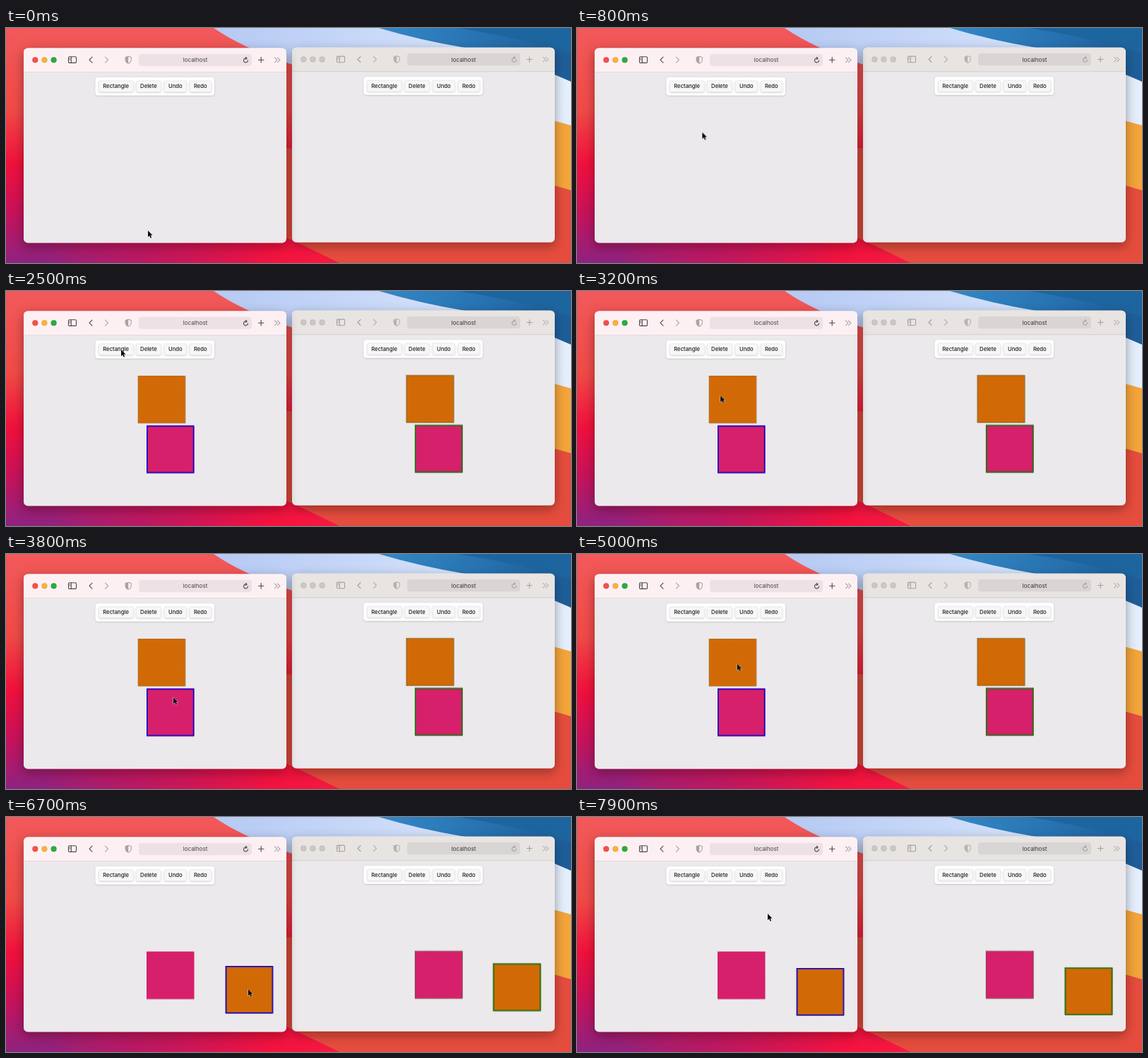
Animation, 800 px wide and 333 px high, one loop 8 s. Source, as an HTML page:

```html
<!DOCTYPE html>
<html lang="en">
<head>
<meta charset="utf-8">
<title>Shared canvas in two windows</title>
<style>
html, body { margin: 0; width: 100%; height: 100%; overflow: hidden; background: #ee4a48; }
svg { display: block; width: 800px; height: 333px; }
text { font-family: Inter, "Noto Sans", sans-serif; text-anchor: middle; }

.active { --bar: #fdf0f3; --line: #e3d5d8; --pill: #ede1e5; --icon: #4d474a; --soft: #aaa1a5;
  --red: #f54f4b; --yellow: #f9b23c; --green: #29ad3c; --label: #4b4548; }
.idle { --bar: #e8e4e2; --line: #cfcac8; --pill: #d9d5d4; --icon: #a5a09f; --soft: #b7b2b1;
  --red: #cbc7c5; --yellow: #cbc7c5; --green: #cbc7c5; --label: #383536; }
.mine { --pick: #0900d6; --edge: #777368; }
.theirs { --pick: #14780f; --edge: #4c5b2e; }

.stroke { fill: none; stroke: var(--icon); stroke-width: 1.1; stroke-linecap: round; stroke-linejoin: round; }
.soft { stroke: var(--soft); }
.button { fill: #f8f7f8; stroke: #e5e3e5; stroke-width: .7; }
.label { font-size: 7.7px; font-weight: 500; fill: #1d1c1d; }
.dots { fill: none; stroke: var(--edge); stroke-width: .7; stroke-dasharray: 1.3 1.3; }
.pick { fill: none; stroke: var(--pick); stroke-width: 1.6; }

.orange, .pink, .orange .pick, .pink .pick, .drag, .cursor { animation: 8s linear infinite; }
.orange, .pink, .pick { animation-timing-function: step-end !important; }
.orange { animation-name: show-first; }
.pink { animation-name: show-second; }
.orange .pick { animation-name: pick-first; }
.pink .pick { animation-name: pick-second; }
.mine .drag { animation-name: drag; }
.theirs .drag { animation-name: follow; }
.cursor { animation-name: point; }

@keyframes show-first { 0% { opacity: 0; } 15%, 100% { opacity: 1; } }
@keyframes show-second { 0% { opacity: 0; } 28.75%, 100% { opacity: 1; } }
@keyframes pick-first { 0% { opacity: 1; } 28.75% { opacity: 0; } 66.25%, 100% { opacity: 1; } }
@keyframes pick-second { 0% { opacity: 1; } 66.25%, 100% { opacity: 0; } }
@keyframes drag {
  0%, 67.5% { transform: translate(0, 0); }
  73.75% { transform: translate(75px, 1.5px); }
  78% { transform: translate(121px, 38px); }
  83.75% { transform: translate(124px, 91px); }
  86%, 100% { transform: translate(124px, 94px); }
}
@keyframes follow {
  0%, 69.5% { transform: translate(0, 0); }
  73.75% { transform: translate(50.5px, 1.5px); }
  75.5% { transform: translate(75px, 4px); }
  80% { transform: translate(121px, 45px); }
  83.75% { transform: translate(123px, 88.2px); }
  87%, 100% { transform: translate(124px, 94px); }
}
@keyframes point {
  0%, 2.5% { transform: translate(201px, 287px); }
  8% { transform: translate(184px, 180px); }
  13.75% { transform: translate(165px, 88px); }
  18.75% { transform: translate(164px, 86.5px); }
  26%, 34% { transform: translate(163px, 83px); }
  40% { transform: translate(203px, 148px); }
  45%, 56% { transform: translate(237px, 203px); }
  63%, 67.5% { transform: translate(226px, 152px); }
  73.75% { transform: translate(301px, 153px); }
  78% { transform: translate(341px, 190px); }
  83.75% { transform: translate(343px, 244px); }
  86%, 91% { transform: translate(343px, 247px); }
  98.75% { transform: translate(270px, 137px); }
  100% { transform: translate(265px, 129px); }
}
</style>
</head>
<body>
<svg viewBox="0 0 800 333">
  <defs>
    <linearGradient id="redWave" x1="0" y1="0" x2="0" y2="1">
      <stop offset="0" stop-color="#f2595a"/>
      <stop offset=".35" stop-color="#f04a47"/>
      <stop offset=".58" stop-color="#f1103c"/>
      <stop offset=".78" stop-color="#c9125a"/>
      <stop offset="1" stop-color="#8d2380"/>
    </linearGradient>
    <linearGradient id="crimson">
      <stop offset="0" stop-color="#f3123f" stop-opacity="0"/>
      <stop offset=".3" stop-color="#d8124f" stop-opacity=".55"/>
      <stop offset=".75" stop-color="#f3123f"/>
      <stop offset="1" stop-color="#f61a40"/>
    </linearGradient>
    <linearGradient id="sky">
      <stop offset="0" stop-color="#b5c9f3"/>
      <stop offset=".45" stop-color="#c9d9f8"/>
      <stop offset="1" stop-color="#e6effc"/>
    </linearGradient>
    <linearGradient id="deep">
      <stop offset="0" stop-color="#3487c6"/>
      <stop offset=".5" stop-color="#2874b3"/>
      <stop offset="1" stop-color="#1d5c97"/>
    </linearGradient>
    <filter id="shade" x="-15%" y="-15%" width="130%" height="135%">
      <feDropShadow dx="0" dy="5" stdDeviation="8" flood-color="#200010" flood-opacity=".36"/>
    </filter>
    <filter id="lift" x="-10%" y="-30%" width="120%" height="170%">
      <feDropShadow dx="0" dy=".8" stdDeviation="1.2" flood-color="#000" flood-opacity=".2"/>
    </filter>

    <g id="window">
      <rect x="25" y="28.5" width="372" height="276" rx="6" fill="#ebe9eb" filter="url(#shade)"/>
      <path d="M25 62.5V34.5a6 6 0 0 1 6-6H391a6 6 0 0 1 6 6V62.5Z" fill="var(--bar)"/>
      <path d="M25 62.5H397" stroke="var(--line)" stroke-width=".8"/>
      <g stroke="#000" stroke-opacity=".13" stroke-width=".6">
        <circle cx="41.3" cy="45.2" r="4" fill="var(--red)"/>
        <circle cx="54.4" cy="45.2" r="4" fill="var(--yellow)"/>
        <circle cx="67.6" cy="45.2" r="4" fill="var(--green)"/>
      </g>
      <g class="stroke">
        <rect x="88.5" y="40.8" width="11" height="8.6" rx="1.2"/>
        <path d="M92.3 41V49.2M90 43h.8M90 45h.8M122 41.2 118 45.2 122 49.2M357.5 45.2H365M361.2 41.4V49"/>
        <path class="soft" d="M140.5 41.2 144.5 45.2 140.5 49.2M380.5 42 384 45.3 380.5 48.6M384.5 42 388 45.3 384.5 48.6"/>
        <path class="soft" d="M173.2 40.2 177.3 41.6V45.2Q177 48.6 173.2 50.2 169.4 48.6 169.1 45.2V41.6Z"/>
      </g>
      <path d="M173.2 40.2V50.2Q169.4 48.6 169.1 45.2V41.6Z" fill="var(--soft)"/>
      <rect x="188" y="36.7" width="160" height="17.3" rx="4" fill="var(--pill)"/>
      <path class="stroke" stroke-width=".9" d="M342.5 45.8A3 3 0 1 1 339.6 42.9H341M339.6 41.4 341.1 42.9 339.6 44.4"/>
      <text x="268" y="48.3" font-size="8.2" fill="var(--label)">localhost</text>

      <rect x="126.6" y="70" width="168.4" height="25.5" rx="4" fill="#fff" filter="url(#lift)"/>
      <g class="button" filter="url(#lift)">
        <rect x="131.3" y="75" width="49" height="15.6" rx="2.5"/>
        <rect x="184.2" y="75" width="35.4" height="15.6" rx="2.5"/>
        <rect x="224" y="75" width="31.6" height="15.6" rx="2.5"/>
        <rect x="260" y="75" width="30.8" height="15.6" rx="2.5"/>
      </g>
      <g class="label">
        <text x="155.6" y="85.4">Rectangle</text>
        <text x="201.9" y="85.4">Delete</text>
        <text x="239.8" y="85.4">Undo</text>
        <text x="275.3" y="85.4">Redo</text>
      </g>
    </g>
    <g id="tile">
      <rect width="67.4" height="67.4"/>
      <rect class="dots" x=".35" y=".35" width="66.7" height="66.7"/>
    </g>
  </defs>

  <!-- wallpaper -->
  <rect width="800" height="333" fill="url(#redWave)"/>
  <rect y="170" x="60" width="420" height="163" fill="url(#crimson)"/>
  <path d="M294 0Q335 28 400 50T620 95L800 140V0Z" fill="url(#sky)"/>
  <path d="M528 0Q585 17 650 28T800 76V0Z" fill="url(#deep)"/>
  <path d="M640 0Q720 12 800 36V0Z" fill="#1d659f"/>
  <path d="M500 90Q650 95 800 138V231Q690 200 500 180Z" fill="#f3a43a"/>
  <path d="M397 170Q650 185 800 230V333H472Q430 312 397 297Z" fill="#e54c3d"/>

  <g class="idle"><use href="#window" x="380" y="-.7"/></g>
  <g class="theirs" transform="translate(380 -.7)">
    <g class="orange"><g class="drag"><g transform="translate(186.7 120)" fill="#d16a06">
      <use href="#tile"/><rect class="pick" x=".8" y=".8" width="65.8" height="65.8"/><rect class="dots" width="67.4" height="67.4"/>
    </g></g></g>
    <g class="pink"><g transform="translate(199 190.6)" fill="#d6206b">
      <use href="#tile"/><rect class="pick" x=".8" y=".8" width="65.8" height="65.8"/><rect class="dots" width="67.4" height="67.4"/>
    </g></g>
  </g>

  <g class="active"><use href="#window"/></g>
  <g class="mine">
    <g class="orange"><g class="drag"><g transform="translate(186.7 120)" fill="#d16a06">
      <use href="#tile"/><rect class="pick" x=".8" y=".8" width="65.8" height="65.8"/>
    </g></g></g>
    <g class="pink"><g transform="translate(199 190.6)" fill="#d6206b" style="--edge:#c92a70">
      <use href="#tile"/><rect class="pick" x=".8" y=".8" width="65.8" height="65.8"/>
    </g></g>
  </g>

  <g class="cursor">
    <path d="M0 0V9.2L2.1 7.3 3.6 10.8 5.2 10.1 3.7 6.7H6.5Z" fill="#080808" stroke="#fff" stroke-width=".8" stroke-linejoin="round" paint-order="stroke"/>
  </g>
</svg>
</body>
</html>
```
